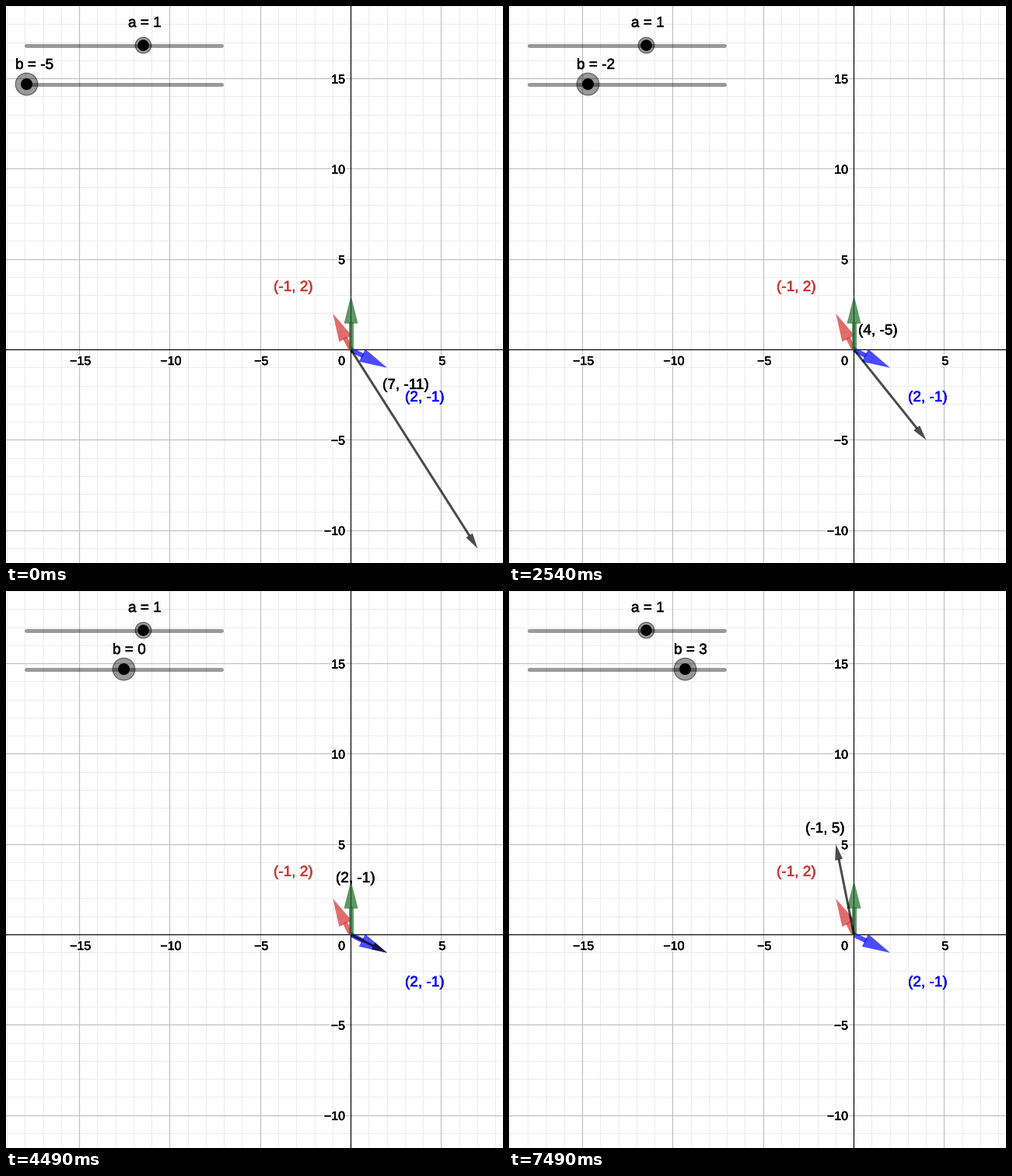
Recreate the animation shown at these times as a matplotlib script. Size 639 by 717 pixels, loop 8 s.

```python
import numpy as np
import matplotlib.pyplot as plt
from matplotlib.animation import FuncAnimation
from matplotlib.patches import Circle, Polygon
from matplotlib.patheffects import withStroke

W, H, DPI = 639, 717, 64
PT = 72 / DPI                       # points per pixel
STEP, LOOP = 40, 8000
CHANGES = [600, 1490, 2540, 3590, 4490, 5540, 6440, 7490]

ORIGIN = np.array([443.05, 442.0])
UNIT = 23.26
RED_VEC, BLUE_VEC = np.array([-1, 2]), np.array([2, -1])

plt.rcParams["font.family"] = "Liberation Sans"
fig = plt.figure(figsize=(W / DPI, H / DPI), dpi=DPI, facecolor="white")
ax = fig.add_axes([0, 0, 1, 1])
ax.set(xlim=(0, W), ylim=(H, 0))
ax.axis("off")


def to_px(v):
    return ORIGIN + UNIT * np.array([v[0], -v[1]])


def label(x, y, text, size=19, color="black", halo=0, z=8, **kw):
    """Text with slightly thickened strokes and an optional white halo."""
    effects = [withStroke(linewidth=0.5 * PT, foreground=color)]
    if halo:
        effects.insert(0, withStroke(linewidth=halo * PT, foreground="white"))
    return ax.text(x, y, text, fontsize=size * PT, color=color, zorder=z,
                   va="baseline", path_effects=effects, **kw)


def grid():
    for k in range(-20, 21):
        x, y = to_px((k, k))
        if k == 0:
            color, width, z = "black", 1.2, 2
        elif k % 5 == 0:
            color, width, z = "#c0c0c0", 1.2, 1
        else:
            color, width, z = "#ececec", 1, 0
        style = dict(color=color, lw=width * PT, zorder=z)
        if 0 <= x <= W:
            ax.plot([x, x], [0, H], **style)
        if 0 <= y <= H:
            ax.plot([0, W], [y, y], **style)


def axis_numbers():
    def number(x, y, k, ha):
        text = str(k).replace("-", "\u2212")
        label(x, y, text, 16, halo=4, z=3, ha=ha)

    for k in (-15, -10, -5, 5):
        number(to_px((k, 0))[0] + 1.5, 462, k, "center")
    for k in (-10, -5, 5, 10, 15):
        number(436, to_px((0, k))[1] + 6.4, k, "right")
    number(436, 462, 0, "right")


class Arrow:
    def __init__(self, color, width, head, z):
        self.width, self.head = width, head
        self.shaft, = ax.plot([], [], color=color, alpha=0.7, lw=width * PT,
                              solid_capstyle="butt", zorder=z)
        self.tip = Polygon(np.zeros((3, 2)), fc=color, ec="none",
                           alpha=0.7, zorder=z)
        ax.add_patch(self.tip)

    def point(self, v):
        start = ORIGIN + 0.5        # centre of the crossing pixel
        end = to_px(v) + 0.5
        d = (end - start) / np.hypot(*(end - start))
        side = np.array([d[1], -d[0]]) * self.head / 4
        base = end - d * self.head
        stop = base + d * self.width / 4
        self.shaft.set_data([start[0], stop[0]], [start[1], stop[1]])
        self.tip.set_xy([end, base + side, base - side])


class Slider:
    def __init__(self, name, y, radius, inner, caption):
        self.name, self.y, self.caption = name, y, caption
        ax.plot([26, 276.5], [y, y], color="black", alpha=0.4, lw=5 * PT,
                solid_capstyle="round", zorder=6)
        self.parts = [
            Circle((0, y), radius, fc=(0, 0, 0, 0.4), ec=(0, 0, 0, 0.6),
                   lw=PT, zorder=7),
            Circle((0, y), inner, fc="black", ec="none", zorder=7),
        ]
        for part in self.parts:
            ax.add_patch(part)
        self.text = label(0, 0, "")

    def set(self, value):
        x = 151.5 + 25 * value
        for part in self.parts:
            part.center = (x, self.y)
        dx, dy = self.caption
        self.text.set_position((x + dx, self.y + dy))
        self.text.set_text(f"{self.name} = {value}")


def pair(v):
    return f"({v[0]}, {v[1]})"


grid()
axis_numbers()
Arrow("#d32f2f", 6, 36, 4).point(RED_VEC)
Arrow("#0000ff", 6, 36, 4).point(BLUE_VEC)
Arrow("#1b6b25", 6, 36, 4).point((0, 3))
label(344, 367, pair(RED_VEC), color="#d32f2f")
label(513, 509, pair(BLUE_VEC), color="#0000ff")
Slider("a", 50.6, 10.3, 7.2, (-19.5, -23.6)).set(1)

result = Arrow("black", 3, 20, 5)
result_text = label(0, 0, "")
b_slider = Slider("b", 100.6, 14.3, 7.5, (-14.5, -19.6))


def draw(i):
    now = i * STEP + STEP - 1
    b = -5 + sum(now >= t for t in CHANGES)
    v = BLUE_VEC + b * RED_VEC
    result.point(v)
    b_slider.set(b)

    # caption follows the midpoint, nudged along the normal
    normal = np.array([-v[1], -v[0]]) / np.hypot(*v)
    x, y = (ORIGIN + to_px(v)) / 2 + 5.5 * normal + (-45, -73.8)
    result_text.set_position((round(x), round(y)))
    result_text.set_text(pair(v))
    return []


anim = FuncAnimation(fig, draw, frames=LOOP // STEP, interval=STEP,
                     init_func=lambda: draw(0), repeat=True, repeat_delay=0)
plt.show()
```
